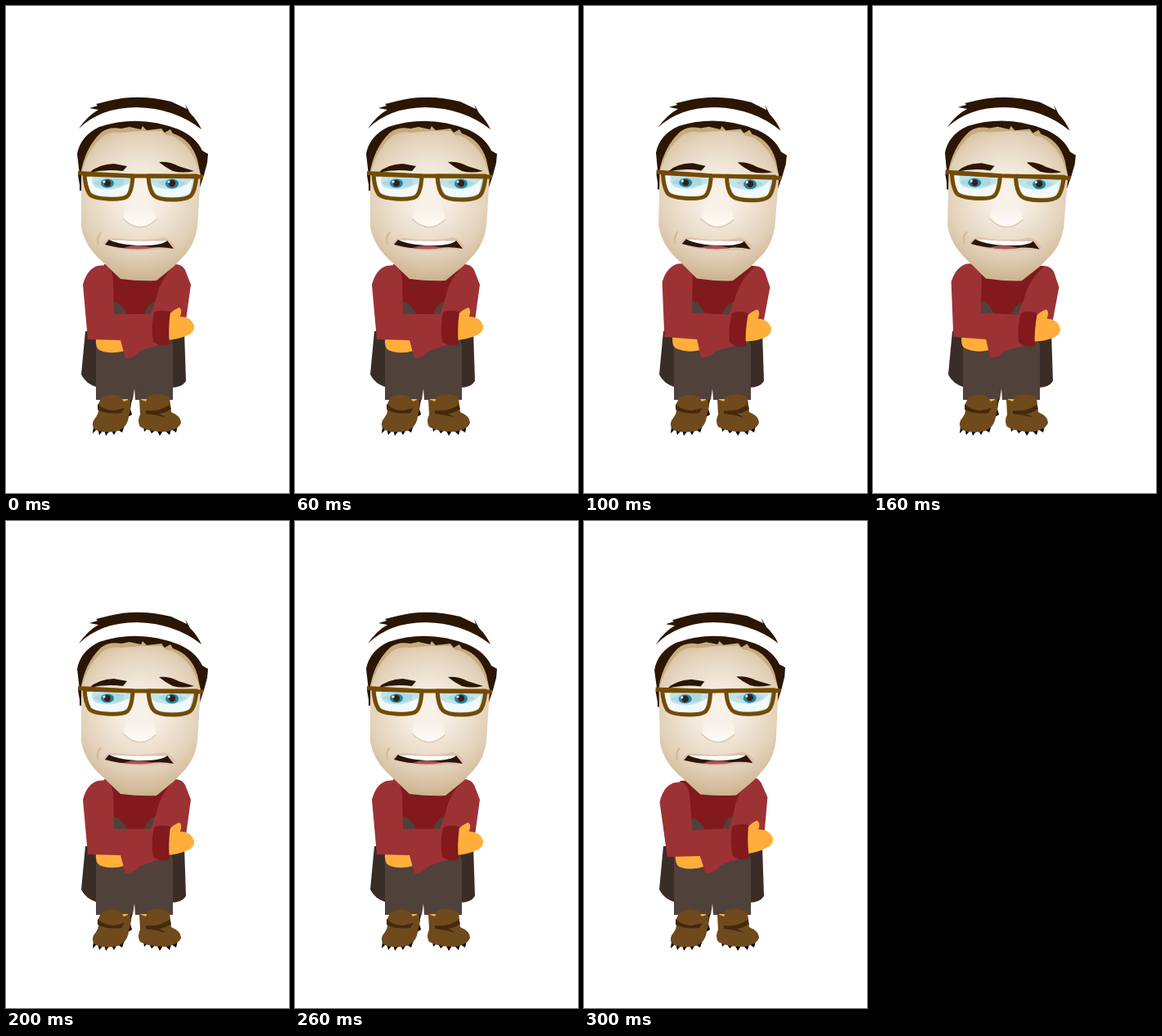
Write an HTML page that moves like this. It is 346x596 px and loops after 400 ms.

```html
<!DOCTYPE html>
<html lang="en">
<head>
<meta charset="utf-8">
<title>Shivering man</title>
<style>
html, body { margin: 0; width: 100%; height: 100%; overflow: hidden; background: #fff; }
svg { display: block; width: 346px; height: 596px; }
</style>
</head>
<body>
<svg viewBox="0 0 346 596">
  <defs>
    <radialGradient id="skin" gradientUnits="userSpaceOnUse" cx="164" cy="232" r="108">
      <stop offset="0" stop-color="#fbf6ef"/>
      <stop offset=".3" stop-color="#f3e9dc"/>
      <stop offset=".65" stop-color="#e4d3bc"/>
      <stop offset="1" stop-color="#c9b08a"/>
    </radialGradient>
    <linearGradient id="nose" x1="0" y1="0" x2="0" y2="1">
      <stop offset="0" stop-color="#f3eadc" stop-opacity=".2"/>
      <stop offset="1" stop-color="#fffdfa"/>
    </linearGradient>
    <path id="lensL" d="M96 206L155 208Q154 228 148 233Q143 237 124 236Q106 235 102 230Q97 222 96 206Z"/>
    <path id="lensR" d="M174 208L233 208Q231 227 226 232Q221 237 203 237Q186 237 181 232Q175 226 174 208Z"/>
    <clipPath id="clipL"><use href="#lensL"/></clipPath>
    <clipPath id="clipR"><use href="#lensR"/></clipPath>
  </defs>

  <g id="legs">
    <path fill="#3a2d28" d="M97 398L92 451Q97 462 112 467V398ZM202 398H218L220 459Q215 467 202 467Z"/>
    <path fill="#50413b" d="M110 395H198L204 415V482H158L157 468L155 482H110Z"/>
    <path fill="#ffae3b" d="M139 481H149V485H139ZM165 481H178V485H165Z"/>
    <path fill="#000" d="M107 515L106 523L112 517L114 525L120 518L122 526L128 518L132 525L136 518L142 522L145 513ZM168 514L169 521L174 516L178 523L184 518L188 526L193 518L200 525L202 518L208 522L210 513ZM149 482L154 482L152 493L154 500L149 503Z"/>
    <path fill="#6e4a1d" d="M116 480Q128 472 140 478L144 484L152 481Q154 490 150 503Q148 516 137 520Q119 524 108 518Q103 511 110 503Q115 496 112 489Z"/>
    <path fill="#6e4a1d" d="M163 481L171 484L174 477Q188 472 200 479L202 497Q214 502 214 510Q211 519 195 521Q174 521 164 515Q160 508 164 500Z"/>
    <path fill="#45290d" d="M112 487Q120 495 132 495L145 492L141 498Q124 500 112 494ZM171 495Q187 497 200 488L202 493Q195 498 187 499Q192 501 196 504Q184 500 171 499Z"/>
  </g>

  <path fill="#50413b" d="M128 350H190V402H128Z"/>
  <g id="arms">
    <path fill="#82191d" d="M120 316H208L184 361Q174 363 169 377H148Q141 363 132 362Z"/>
    <path fill="#ffae3b" d="M110 405H143L145 422Q127 427 114 421Q109 418 110 405Z"/>
    <path fill="#9c3234" d="M207 316Q215 316 219 323L226 341L219 392L200 404L176 380L184 357Q188 335 207 316Z"/>
    <path fill="#9c3234" d="M122 317Q130 322 131 334L132 377H184L186 415L164 422Q157 431 146 431L140 409L100 408L94 341Q99 322 112 318Z"/>
    <path fill="#ffae3b" d="M197 380Q205 371 212 369Q216 372 213 380Q226 380 230 391Q231 399 222 403Q211 408 197 409Z"/>
    <path fill="#82191d" d="M181 375Q188 371 201 374Q198 396 200 414Q190 418 180 411Q177 393 181 375Z"/>
  </g>

  <g id="head">
    <path fill="#2b1604" d="M89 150Q100 134 113 127L102 125L112 122L110 120L126 116Q161 107 202 117L221 126L219 120L225 131Q234 140 239 151Q206 125 160 124Q116 124 89 150Z"/>
    <path fill="#2b1604" d="M90 207L87 181Q91 159 114 148Q162 132 211 151Q232 160 240 177L247 181L246 192L242 207L237 222L90 226Z"/>
    <path fill="#c8ab7c" d="M91 207Q96 174 116 155Q126 147 141 150L151 148L165 151L167 147L172 152L190 150L194 155L201 151L204 156Q226 163 234 188L238 207Z"/>
    <path fill="url(#skin)" d="M92 207Q98 177 119 159Q129 153 141 155L165 153L190 153L196 158L203 159Q223 169 232 190L238 207L234 270Q231 290 220 303L206 318L184 336Q163 337 140 334L118 313Q96 294 92 270Z"/>
    <path fill="#2b1604" d="M102 204Q112 194 132 193L148 196L143 202Q122 199 102 204ZM187 191Q200 190 211 196L230 202Q216 205 204 202Q194 197 187 191Z"/>

    <g clip-path="url(#clipL)">
      <path fill="#c1e4e9" d="M94 205H157V240H94Z"/>
      <path fill="#fff" d="M97 208H106Q103 218 110 222Q128 228 144 220L151 217L148 236L104 234Z" opacity=".8"/>
      <path fill="#aad8e1" d="M106 217Q119 208 144 212L143 219Q122 226 106 217Z"/>
      <ellipse cx="124" cy="217" rx="8" ry="5.500" fill="#2780a5"/>
      <circle cx="124" cy="217" r="4" fill="#38200f"/>
      <circle cx="120" cy="215" r="1.600" fill="#d9f3f7"/>
    </g>
    <g clip-path="url(#clipR)">
      <path fill="#c1e4e9" d="M171 205H236V240H171Z"/>
      <path fill="#fff" d="M177 217Q182 222 190 223Q206 227 220 219L228 212L225 230Q204 237 184 231Z" opacity=".8"/>
      <path fill="#aad8e1" d="M186 216Q202 207 220 217Q203 228 186 216Z"/>
      <ellipse cx="203" cy="217.500" rx="8" ry="6" fill="#2780a5"/>
      <circle cx="203" cy="217" r="4.200" fill="#38200f"/>
      <circle cx="199" cy="215" r="1.600" fill="#d9f3f7"/>
    </g>
    <path fill="url(#nose)" d="M151 225H176L184 261Q164 279 143 260Z"/>
    <path fill="none" stroke="#dfcbad" stroke-width="1.500" d="M143 260Q163 281 184 261"/>
    <g fill="none" stroke="#734b04" stroke-width="5" stroke-linejoin="round">
      <use href="#lensL"/>
      <use href="#lensR"/>
      <path d="M88 204.500L155 208L172 208L241 209"/>
    </g>
    <path fill="#2b1604" d="M88 207H91L91 225Z"/>

    <path fill="none" stroke="#d2b991" stroke-width="2" d="M116 277Q110 284 113 292"/>
    <path fill="#dfc0b0" d="M119 291Q122 283 135 284Q166 289 193 283Q204 287 208 295Q202 299 188 298Q160 301 136 297Z"/>
    <path fill="#2b1604" d="M121 292L126 286Q163 290 197 287L205 297Q190 294 176 296Q145 299 121 292Z"/>
    <path fill="#a45350" d="M144 296Q160 290 180 296Q161 299 144 296Z"/>
    <path fill="#fff" d="M126 286Q163 289 197 287Q191 293 167 293Q140 293 126 286Z"/>
  </g>
</svg>
<script>
const head = document.getElementById("head");
const arms = document.getElementById("arms");
const sway = [0, 1, 0, -1];

function draw(now) {
  const lean = sway[Math.floor(now / 100) % 4];
  head.setAttribute("transform", `rotate(${1.15 * lean} 165 228)`);
  arms.setAttribute("transform", `rotate(${2.8 * lean} 162 372)`);
  requestAnimationFrame(draw);
}
draw(0);
</script>
</body>
</html>
```
